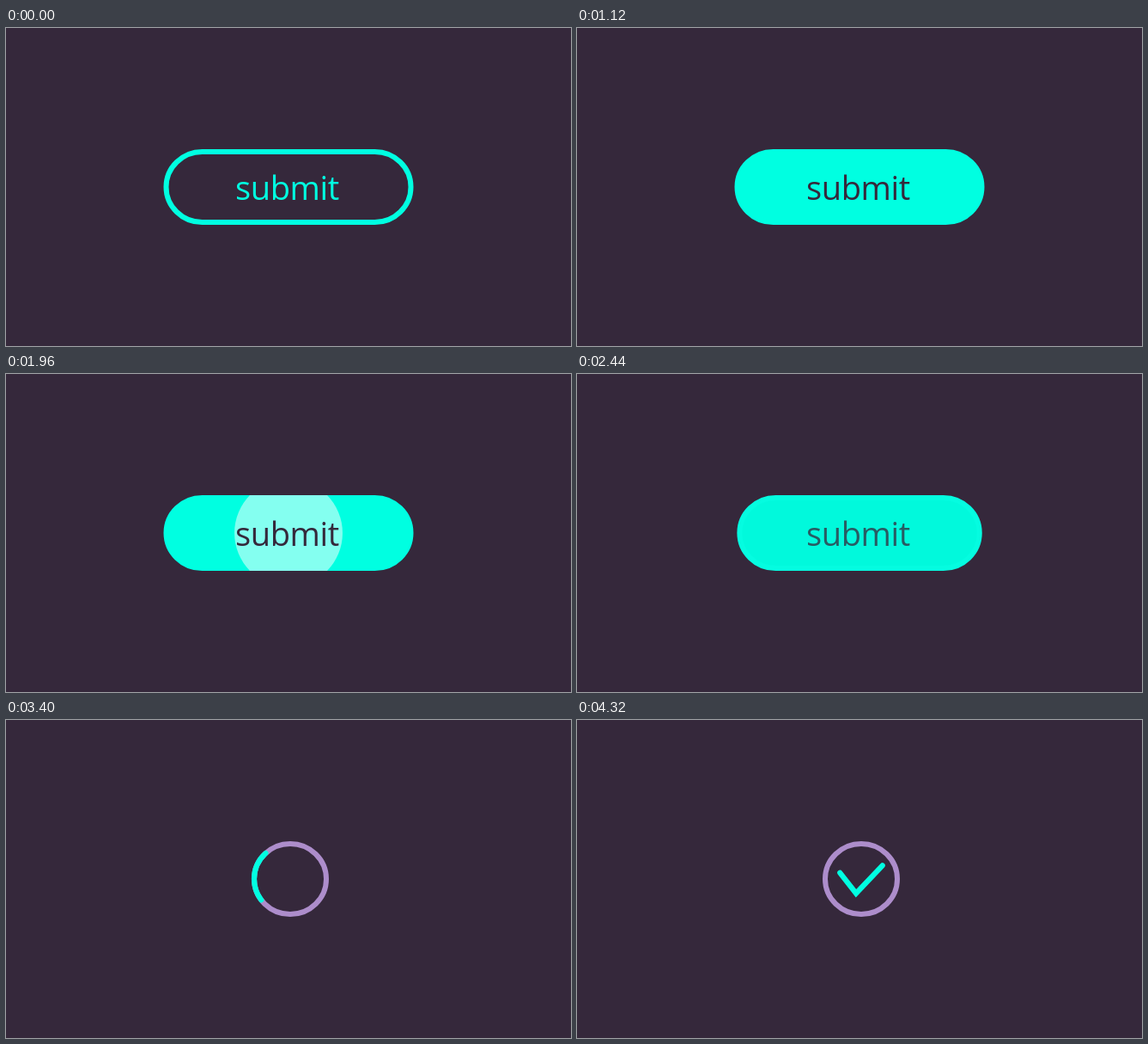
An HTML page that plays this animation: 658x370 px, repeating every 4.52 s.

```html
<!DOCTYPE html>
<html lang="en">
<head>
<meta charset="utf-8">
<title>Submit button</title>
<style>
  html, body { margin: 0; width: 100%; height: 100%; overflow: hidden; background: #35283b; }
  svg { display: block; width: 658px; height: 370px; }
  text { font: 38px "Open Sans", "Noto Sans", sans-serif; letter-spacing: -.4px; }
  .line { fill: none; stroke: #00ffe1; stroke-width: 6.2; stroke-linecap: round; }
</style>
</head>
<body>
<svg viewBox="0 0 658 370">
  <clipPath id="pill"><rect x="183.5" y="141" width="291" height="88" rx="45" ry="44"/></clipPath>
  <rect id="button" y="144" height="82" rx="42" ry="41" fill="#00ffe1" stroke-width="6"/>
  <g clip-path="url(#pill)"><circle id="ripple" cx="329" cy="185" fill="#fff"/></g>
  <text id="label" x="267" y="200">submit</text>
  <path id="arc" class="line" pathLength="720"
    d="M331 144a42 41 0 0 1 0 82a42 41 0 0 1 0-82a42 41 0 0 1 0 82a42 41 0 0 1 0-82"/>
  <path id="check" class="line" pathLength="1" d="M306.3 177.8L325 201.7L355.7 169.3"/>
</svg>
<script>
const LOOP = 4520, STEP = 40;
const DARK = [53, 40, 59], CYAN = [0, 255, 225], PURPLE = [173, 141, 203];

const [button, ripple, label, arc, check] =
  ["button", "ripple", "label", "arc", "check"].map(id => document.getElementById(id));

const span = (t, from, to) => Math.min(1, Math.max(0, (t - from) / (to - from)));
const smooth = p => p * p * (3 - 2 * p);
const lerp = (a, b, p) => a + (b - a) * p;
const mix = (a, b, p) => `rgb(${a.map((v, i) => Math.round(lerp(v, b[i], p)))})`;

function set(el, attrs) {
  for (const name in attrs) el.setAttribute(name, attrs[name]);
}

// Shows the part of a path between two positions along it.
function trim(el, from, to, total) {
  set(el, {
    visibility: to > from ? "visible" : "hidden",
    "stroke-dasharray": `${to - from} ${total * 2}`,
    "stroke-dashoffset": -from
  });
}

function draw(t) {
  const fill = smooth(span(t, 480, 1120));
  const wave = span(t, 1440, 2240);
  const shrink = span(t, 2400, 2800);
  const spin = span(t, 2960, 3960);
  const tick = span(t, 3960, 4320);
  const size = smooth(shrink);

  set(button, {
    x: lerp(186.5, 289, size),
    width: lerp(285, 84, size),
    "fill-opacity": fill * (1 - size),
    stroke: mix(CYAN, PURPLE, size)
  });
  set(ripple, {
    r: 149 * wave ** 2,
    opacity: 1 - wave ** 1.7
  });
  set(label, {
    fill: mix(CYAN, DARK, fill),
    opacity: Math.max(0, 1 - 2.5 * shrink)
  });
  trim(arc, 720 * spin ** 1.37, 720 * spin, 720);
  trim(check, 0, 1 - (1 - tick) ** 2.2, 1);
}

const start = performance.now();
function frame() {
  const t = (performance.now() - start) % LOOP;
  draw(Math.floor(t / STEP) * STEP);
  requestAnimationFrame(frame);
}
frame();
</script>
</body>
</html>
```
